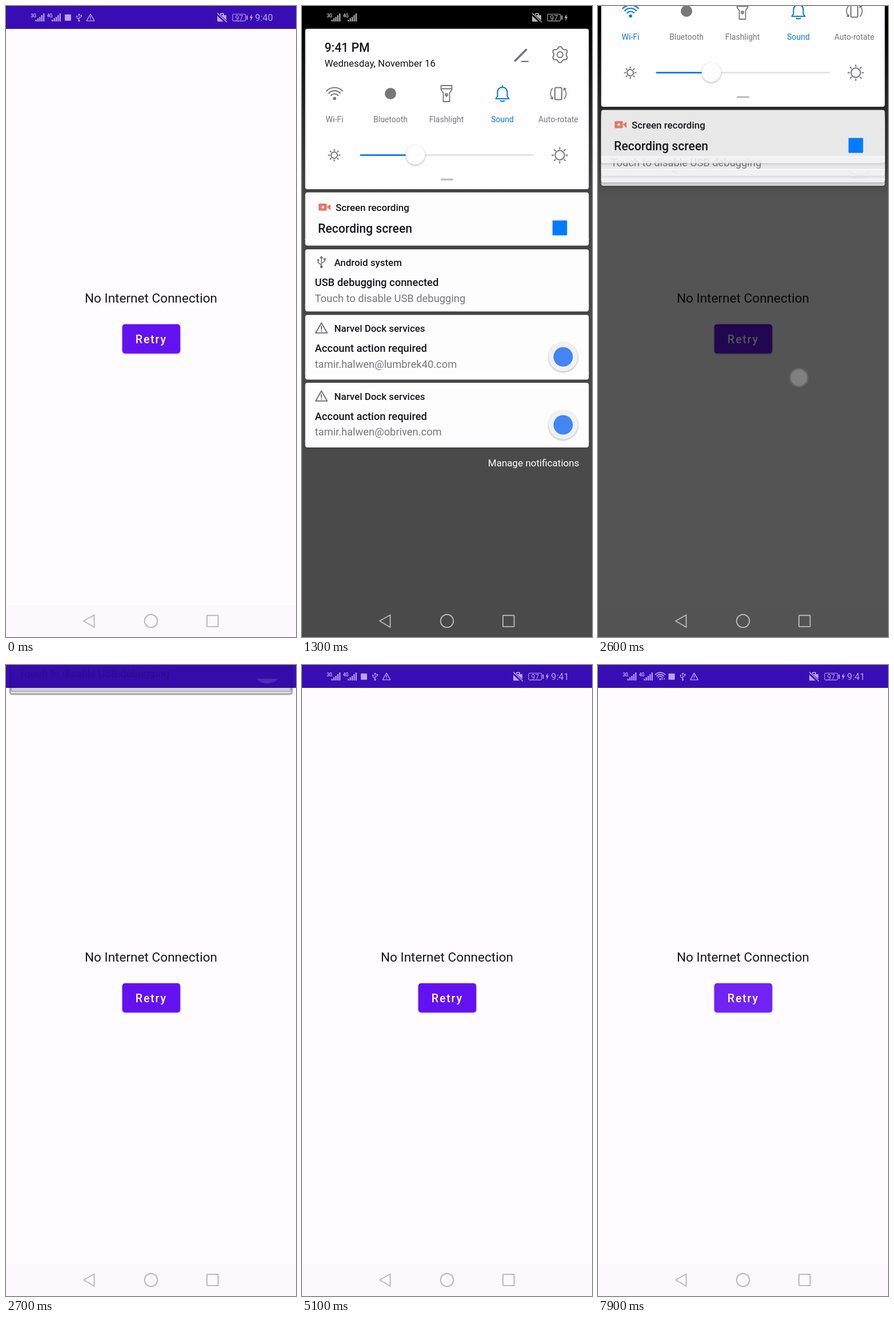
An HTML page for the animation above (8000 ms loop, 508x1102 px).

```html
<!DOCTYPE html>
<html lang="en">
<head>
<meta charset="utf-8">
<title>Offline screen</title>
<style>
html, body { margin: 0; width: 100%; height: 100%; overflow: hidden; background: #fefcff; }
svg { display: block; width: 508px; height: 1102px; font-family: Roboto, sans-serif; }
.line { fill: none; stroke: currentColor; stroke-linecap: round; stroke-linejoin: round; }
.solid { fill: currentColor; stroke: none; }
.card { filter: drop-shadow(0 1px 2px rgba(0,0,0,.25)); }
.soft { filter: drop-shadow(0 1px 1.5px rgba(0,0,0,.35)); }
</style>
</head>
<body>
<svg id="stage" viewBox="0 0 508 1102"></svg>
<script>
const stage = document.getElementById('stage');
const INK = '#17161a', GREY = '#77767a', BLUE = '#0a78e2', PAPER = '#fefdff';

const text = (x, y, size, str, color = INK, weight = 400, extra = '') =>
  `<text x="${x}" y="${y}" font-size="${size}" fill="${color}" font-weight="${weight}" ${extra}>${str}</text>`;
const rect = (x, y, w, h, attrs) => `<rect x="${x}" y="${y}" width="${w}" height="${h}" ${attrs}/>`;
const circle = (x, y, r, attrs) => `<circle cx="${x}" cy="${y}" r="${r}" ${attrs}/>`;
const line = (d, w = 2, attrs = '') => `<path class="line" stroke-width="${w}" d="${d}" ${attrs}/>`;
const solid = d => `<path class="solid" d="${d}"/>`;
const at = (x, y, body, scale = 1) => `<g transform="translate(${x} ${y}) scale(${scale})">${body}</g>`;
const tint = (color, body, id = '') => `<g ${id && `id="${id}"`} color="${color}">${body}</g>`;

// Icons are drawn around their own centre
const arc = r => { const a = r * Math.SQRT1_2; return `M${-a} ${9 - a}A${r} ${r} 0 0 1 ${a} ${9 - a}`; };
const wifi = w => line([19.5, 14, 8.5].map(arc).join(''), w) + circle(0, 8.5, 2.8, 'class="solid"');
const usb = line('M0 8V-8M0 5L-6 1V-3M0 2L6 -2V-5', 1.7) + circle(0, 8.5, 2.6, 'class="solid"') +
  solid('M-3.5 -7L0 -12L3.5 -7z') + circle(-6, -4, 2, 'class="solid"') + rect(4, -7.5, 4, 4, 'class="solid"');
const warning = line('M0 -8.5L9.8 8.5H-9.8z', 2) + line('M0 -2.5V2.5M0 5.3V5.4', 2);
const flashlight = line('M-9.5 -14H9.5V-7L5.5 -1V14H-5.5V-1L-9.5 -7zM-9.5 -8.5H9.5M0 2V5', 1.8) +
  circle(0, 2, 2.2, 'class="line" stroke-width="1.6"');
const bell = line('M-11.5 9H11.5L8.5 4.5V-2.5C8.5 -8 5 -11 0 -11S-8.5 -8 -8.5 -2.5V4.5zM0 -11V-13.5M-3.5 12.5Q0 14.5 3.5 12.5', 2.1);
const rotate = rect(-6, -10.5, 12, 21, 'rx="2" class="line" stroke-width="2"') +
  line('M-10.5 -9Q-17 0 -10.5 9M10.5 -9Q17 0 10.5 9M-13 8.5L-10 9.5L-9.5 6M13 -8.5L10 -9.5L9.5 -6', 1.7);
const pencil = line('M-9.5 9.5L9.5 -9.5', 3.8) + line('M2 10.8H13', 2.2);
const sun = (r, a, b) => circle(0, 0, r, 'class="line" stroke-width="2"') +
  line([...Array(8)].map((_, i) => {
    const x = Math.cos(i * Math.PI / 4), y = Math.sin(i * Math.PI / 4);
    return `M${x * a} ${y * a}L${x * b} ${y * b}`;
  }).join(''), 2);
const gear = line('M' + [...Array(72)].map((_, i) => {
  const a = i * Math.PI / 36, r = 12.4 + 1.5 * Math.tanh(2 * Math.cos(6 * a + Math.PI));
  return `${(r * Math.cos(a)).toFixed(1)} ${(r * Math.sin(a)).toFixed(1)}`;
}).join('L') + 'z', 2) + circle(0, 0, 5, 'class="line" stroke-width="2"');

// Status bar parts
const signal = (x, label) =>
  text(x, 19.5, 8.2, label, 'currentColor', 700, 'letter-spacing="-.5"') +
  [3, 5.5, 8, 11, 14].map((h, i) => rect(x + 8.3 + i * 3.4, 27 - h, 2.2, h, 'class="solid"')).join('');
const signals = signal(43.2, '3G') + signal(71.8, '4G');
const notices = rect(103, 14.8, 11, 11, 'rx="1" class="solid"') + at(128, 20.4, usb, .62) + at(148, 20, warning, .69);
const power =
  solid('M371 16H373L371 14V16zM375 16V14Q375 12.3 376.7 12.3H380.3Q382 12.3 382 14V16H386V25L375 15zM377 16H380V14H377zM370 17L381 27.3H371.5Q370 27.3 370 26z') +
  line('M370.5 12.5L386.5 28', 1.5) +
  rect(397, 14.3, 22.6, 11.8, 'rx="1.5" class="line" stroke-width="1.1"') +
  rect(421.3, 16.5, 2, 7.5, 'class="solid"') +
  text(408.4, 24.6, 12.2, '97', 'currentColor', 400, 'text-anchor="middle"') +
  solid('M430.6 13.8L426.8 20.8H429L428.3 26.4L432.4 18.8H430z');

// Notification card whose lower strip turns translucent while stacked
const card = (i, top, bottom, body) => `<g id="card${i}"><g class="card">
  <path class="face" d="M5.6 ${bottom - 10}V${top + 4}q0 -4 4 -4H498.4q4 0 4 4V${bottom - 10}z"/>
  <path class="strip" fill="${PAPER}" d="M5.6 ${bottom - 12}H502.4V${bottom - 4}q0 4 -4 4H9.6q-4 0 -4 -4z"/></g>${body}</g>`;
const account = (y, mail) =>
  tint(GREY, at(34, y - 36, warning, 1.03)) +
  text(56.5, y - 29.5, 16.93, 'Narvel Dock services', INK, 500) +
  text(22.5, y + 5.7, 18.35, 'Account action required', INK, 500) +
  text(22.5, y + 33.2, 18.35, mail, GREY) +
  circle(457.5, y + 14.5, 25.5, 'fill="#f1f0f3" class="soft"') + circle(457.5, y + 14.5, 17, 'fill="#4285f4"');

const tile = (x, label, icon, color = GREY, id = '') => tint(color,
  at(x, 153, icon) + text(x, 203, 14, label, 'currentColor', 400, 'text-anchor="middle"'), id);

const quick = rect(5.6, 39.7, 496.8, 280.3, `rx="4" fill="${PAPER}" class="card"`) +
  text(39.5, 79.5, 21.2, '9:41 PM', INK, 500) +
  text(39.5, 106, 16.93, 'Wednesday, November 16') +
  tint(GREY, at(383, 86, pencil) + at(452, 85, gear) + at(56.5, 260.5, sun(5.5, 8, 10)) + at(451.5, 260.5, sun(8.2, 11, 13.5))) +
  tile(57, 'Wi-Fi', wifi(2.2), GREY, 'wifiTile') +
  tile(155, 'Bluetooth', circle(0, 0, 10, 'class="solid"')) +
  tile(253, 'Flashlight', flashlight) + tile(351, 'Sound', bell, BLUE) + tile(449, 'Auto-rotate', rotate) +
  tint('#e4e2e6', line('M103 260.3H405', 2.8)) + tint(BLUE, line('M103 260.3H198', 2.8)) +
  circle(198.5, 260, 17, `fill="${PAPER}" class="soft"`) +
  tint('#b9b8bb', line('M244.5 303H263.5', 3.2));

stage.innerHTML = `
<defs>
  <linearGradient id="dark" x2="0" y2="1"><stop offset=".1"/><stop offset=".55" stop-opacity=".45"/><stop offset="1" stop-opacity="0"/></linearGradient>
  <clipPath id="btnClip">${rect(203.7, 555.7, 101.5, 51, 'rx="5"')}</clipPath>
</defs>
${rect(0, 0, 508, 1102, 'fill="#fefcff"')}
${rect(0, 1046, 508, 56, 'fill="#fbf9fc"')}
${rect(0, 0, 508, 40, 'fill="#390db4"')}
${tint('#b9a4e4', signals + `<g id="notices">${notices}</g>` +
  `<g id="wifiBar">${at(109, 19.6, wifi(2.9), .62)}<path id="arrows" class="solid" d="M111 24.2l2 -2.6v5zM117.2 24.2l-2 -2.6v5z"/></g>` +
  power + text(436.3, 25.8, 16.2, '9:40', 'currentColor', 400, 'id="clock"'), 'status')}
${text(254, 518.3, 22.58, 'No Internet Connection', INK, 400, 'text-anchor="middle"')}
${rect(203.7, 555.7, 101.5, 51, 'rx="5" fill="#6411f2" class="soft"')}
<g clip-path="url(#btnClip)">${circle(252, 582, 0, 'id="ripple" fill="#fff" opacity=".075"')}</g>
${text(226.8, 589.3, 19.75, 'Retry', '#fff', 500, 'letter-spacing="1.76"')}
<g id="ghost">
  ${rect(7, -10, 494, 61, 'rx="4" fill="#000" fill-opacity=".1" stroke="#000" stroke-opacity=".3" stroke-width="3"')}
  ${rect(9, -10, 490, 56, 'rx="3" fill="#000" fill-opacity=".08" stroke="#000" stroke-opacity=".18" stroke-width="2"')}
  ${rect(0, 0, 508, 40, 'fill="#390db4" opacity=".65"')}
  ${text(22.5, 21, 18.35, 'Touch to disable USB debugging', '#000', 400, 'opacity=".14"')}
  <path d="M438 24H477Q457.5 41 438 24z" fill="#fff" opacity=".13"/>
</g>
<g id="shade">
  ${rect(0, 0, 508, 1102, 'id="scrim"')}
  ${rect(0, 0, 508, 1102, 'id="cover" fill="#4a4a4a"')}
  ${rect(0, 0, 508, 340, 'id="top" fill="url(#dark)"')}
  ${tint('#b4b4b4', signals + at(33, 0, power))}
  ${card(3, 658, 771, account(717, 'tamir.halwen@obriven.com'))}
  ${card(2, 539.5, 652.5, account(598.3, 'tamir.halwen@lumbrek40.com'))}
  ${card(1, 425, 533.5, tint(GREY, at(34, 447.5, usb, .95)) +
    text(56.5, 453.7, 16.93, 'Android system', INK, 500) +
    text(22.5, 489, 18.35, 'USB debugging connected', INK, 500) +
    text(22.5, 517, 18.35, 'Touch to disable USB debugging', GREY))}
  ${card(0, 325.5, 418.5, quick + rect(29, 345, 14.5, 12.5, 'rx="2" fill="#e77769"') +
    '<path d="M43.5 351L50 346V357z" fill="#e77769"/>' + circle(36.5, 351.2, 2.2, 'fill="#fff"') +
    text(59, 358, 16.93, 'Screen recording', INK, 500) +
    text(28, 395.7, 21.17, 'Recording screen', INK, 500) +
    rect(438.8, 374.6, 25.6, 26, 'rx="1" fill="#007bff"'))}
  ${text(485.5, 803.5, 17.05, 'Manage notifications', '#fff', 400, 'text-anchor="end" id="manage"')}
</g>
${tint('#b7b6b9', line('M136 1074L154.5 1063.5V1085z', 1.9) + circle(254, 1074, 11.3, 'class="line" stroke-width="1.9"') +
  rect(352, 1064.3, 19.6, 19.6, 'rx=".6" class="line" stroke-width="1.9"'))}
<g id="dot">${circle(0, 0, 17, 'fill="#aaa" opacity=".2"')}${circle(0, 0, 14.5, 'fill="#999" opacity=".5"')}</g>`;

const $ = id => document.getElementById(id);
const show = (id, on) => $(id).setAttribute('display', on ? 'inline' : 'none');
const set = (id, name, value) => $(id).setAttribute(name, value);
const clamp = v => Math.max(0, Math.min(1, v));
const mix = (a, b, p) => a + (b - a) * p;

// Piecewise linear: keys are [time, value] pairs
function track(keys, t) {
  const i = keys.findIndex(k => k[0] > t);
  if (i < 0) return keys[keys.length - 1][1];
  if (i === 0) return keys[0][1];
  const [a, x] = keys[i - 1], [b, y] = keys[i];
  return mix(x, y, (t - a) / (b - a));
}

// Shade stage: 0 closed, 1 vanishing, 2 stacked, 3 panel down, 4 list open
const OPEN = [[400, 0], [500, 1.6], [600, 2.6], [700, 3], [800, 3.4], [900, 3.65], [1000, 3.82], [1100, 3.93], [1300, 4],
  [2300, 4], [2400, 3.6], [2500, 2.8], [2600, 2], [2700, 1], [2800, 0]];
// Card offsets at stages 1 to 4
const POSE = [[-404, -144, 0, 0], [-496, -237, 0, 0], [-604, -344.5, -54, 0], [-719, -457, -157, 0]];
// Touches: start, end, from x y, to x y
const TOUCH = [[500, 600, 250, 190, 254, 430], [1700, 1800, 57, 160, 57, 160],
  [2400, 2600, 342, 880, 352, 649], [7400, 7500, 252, 582, 252, 582]];

function draw(t) {
  const s = track(OPEN, t), shade = s > 1, late = t >= 6600;
  show('shade', shade);
  show('ghost', s === 1);
  show('status', s === 0);
  set('status', 'opacity', t >= 2800 ? clamp((t - 2700) / 200) : 1);
  $('clock').textContent = t < 500 ? '9:40' : '9:41';
  show('wifiBar', late);
  show('arrows', t >= 7400);
  set('notices', 'transform', `translate(${late ? 20.5 : 0} 0)`);

  if (shade) {
    const k = clamp(s - 1), p = clamp(s - 2);
    set('scrim', 'opacity', .665 * k);
    set('cover', 'opacity', p);
    set('top', 'opacity', k);
    const g = Math.round(mix(233, 254, p));
    POSE.forEach((pose, i) => {
      const j = Math.min(2, Math.floor(s - 1)), el = $('card' + i);
      el.setAttribute('transform', `translate(0 ${mix(pose[j], pose[j + 1], s - 1 - j)})`);
      el.querySelector('.face').setAttribute('fill', `rgb(${g},${g - 1},${g})`);
      el.querySelector('.strip').setAttribute('opacity', mix(.8, 1, p));
    });
    set('manage', 'opacity', clamp((s - 3.6) / .4));
    set('wifiTile', 'color', t >= 1800 ? BLUE : GREY);
  }

  const touch = TOUCH.find(([a, b]) => t >= a && t <= b);
  show('dot', touch);
  if (touch) {
    const [a, b, x, y, u, v] = touch, p = (t - a) / (b - a);
    set('dot', 'transform', `translate(${mix(x, u, p)} ${mix(y, v, p)})`);
  }
  set('ripple', 'r', t < 7400 ? 0 : mix(18, 60, clamp((t - 7400) / 300)));
}

const start = performance.now();
function tick() {
  const t = (performance.now() - start) % 8000;
  draw(Math.floor(t / 100) * 100);
  requestAnimationFrame(tick);
}
tick();
</script>
</body>
</html>
```
